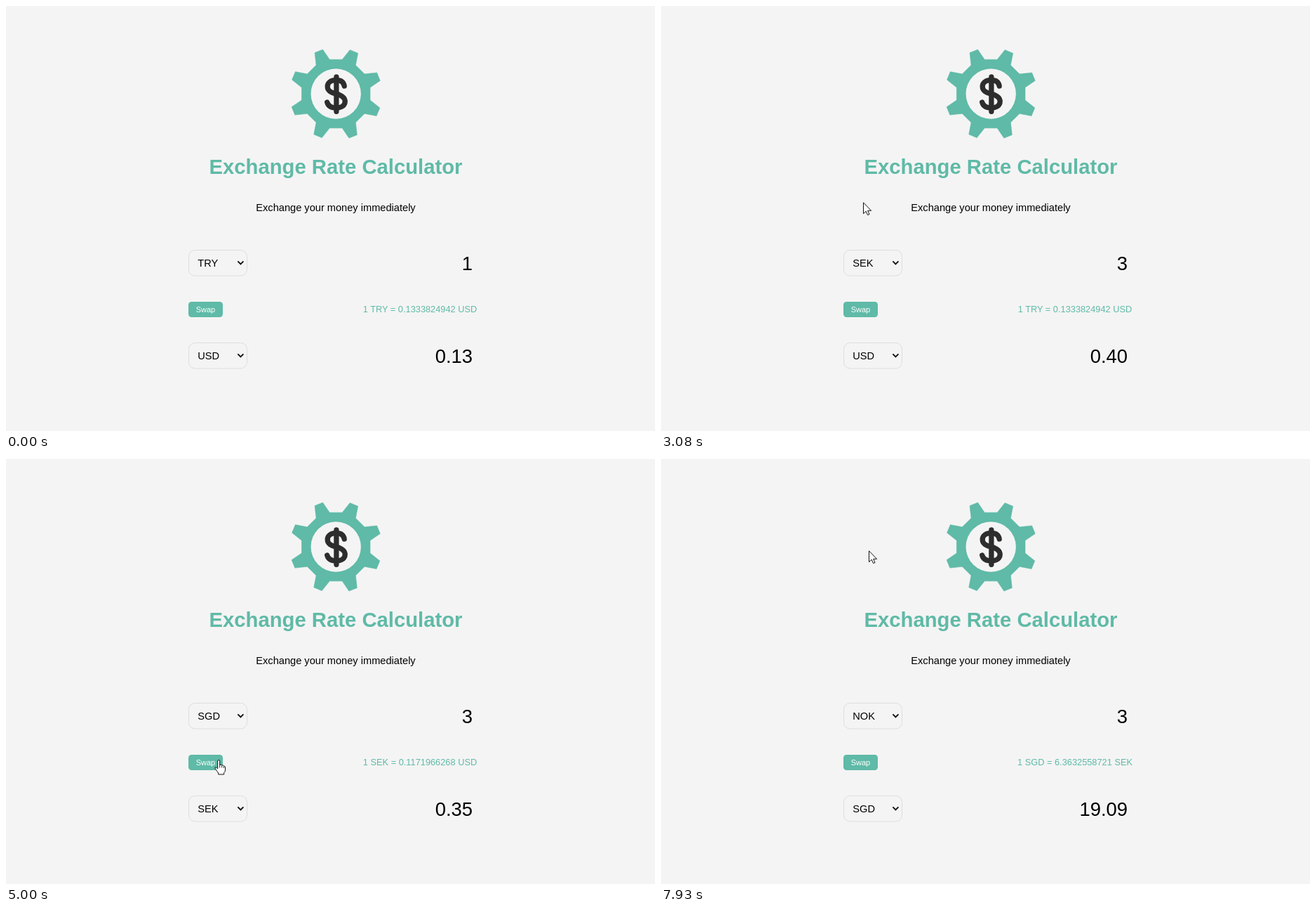
An HTML page that plays this animation: 925x605 px, repeating every 8000 ms.

```html
<!DOCTYPE html>
<html lang="en">
<head>
<meta charset="utf-8">
<title>Exchange Rate Calculator</title>
<style>
html, body { margin: 0; width: 100%; height: 100%; overflow: hidden; background: #f4f4f4; }
svg { display: block; width: 925px; height: 605px; font-family: "Liberation Sans", Arial, sans-serif; font-size: 14.62px; }
.teal { fill: #5fbaa7; }
.big { font-size: 27.4px; text-anchor: end; }
.mid { text-anchor: middle; }
.field { fill: none; stroke: #dedede; }
.chev { fill: none; stroke: #111; stroke-width: 1.9; }
.ink { fill: #fff; stroke: #111; stroke-linejoin: round; }
#menu { filter: drop-shadow(0 0 2px rgba(0, 0, 0, .45)); }
</style>
</head>
<body>
<svg viewBox="0 0 925 605">
  <defs>
    <g id="box">
      <rect class="field" x="260.5" y="-18.5" width="83" height="36.5" rx="9"/>
      <path class="chev" d="M330.4-2.6L334.4 1.4L338.4-2.6"/>
    </g>
  </defs>
  <rect width="925" height="605" fill="#f4f4f4"/>
  <g transform="translate(470.2 125)">
    <path id="gear" class="teal" stroke="#5fbaa7" stroke-width=".6" stroke-linejoin="round"/>
    <circle r="35.7" fill="#f4f4f4"/>
    <g fill="none" stroke="#2d2d2d" stroke-width="7.3" stroke-linecap="round">
      <path d="M12-11C11-17 7-19.5 .5-19.5C-7-19.5-12-16-12-10.5C-12-4-7-2 .5 0C8 2 13 5 13 11C13 16.5 8 20 .5 20C-7 20-11 17.5-12.5 12"/>
      <path d="M.7-24V25.3"/>
    </g>
  </g>
  <text class="teal mid" x="470" y="239" font-size="29.25" font-weight="bold">Exchange Rate Calculator</text>
  <text class="mid" x="470" y="292">Exchange your money immediately</text>

  <use href="#box" y="366"/>
  <text id="from" x="273.3" y="371"></text>
  <use href="#box" y="498"/>
  <text id="to" x="273.3" y="503"></text>

  <rect class="teal" x="260" y="421" width="49" height="22" rx="4.5"/>
  <text class="mid" x="284.5" y="436" font-size="10.97" fill="#fff">Swap</text>
  <text id="rate" class="teal mid" x="590" y="436" font-size="12.8"></text>
  <text id="amount" class="big" x="665" y="376"></text>
  <text id="result" class="big" x="665" y="508"></text>

  <g id="spin">
    <rect x="664" y="350.5" width="14" height="31" fill="#f0f0f0"/>
    <rect id="spinHot" x="664" y="350.5" width="14" height="15.5" fill="#d2d2d2"/>
    <path d="M667.3 361.5L671 357.5L674.7 361.5ZM667.3 371.5L671 375.5L674.7 371.5Z" fill="#505050"/>
  </g>
  <rect id="caret" x="663.5" y="351" width="1.2" height="30"/>

  <g id="menu">
    <rect x="260.5" y="110" width="82.5" height="368.5" fill="#fff" stroke="#767676"/>
    <rect x="327" y="110.5" width="15.5" height="367.5" fill="#f1f1f1"/>
    <rect id="thumb" x="329" width="12" height="129" fill="#c1c1c1"/>
    <path d="M331.2 120.3L335 116.3L338.8 120.3ZM331.2 468L335 472L338.8 468Z" fill="#505050"/>
    <rect id="hot" x="261" width="66" height="18.4" fill="#1e90ff"/>
    <g id="rows"></g>
  </g>

  <g id="cursor">
    <path id="arrow" class="ink" d="M.5 .8V16.6L4.2 13.2L6.6 18.5L9 17.5L6.7 12.3H11.6Z"/>
    <path id="beam" d="M-3-8H-1L0-7L1-8H3M0-7V7M-3 8H-1L0 7L1 8H3" fill="none" stroke="#222"/>
    <g id="hand" transform="translate(-6.3 0)">
      <path class="ink" d="M5 12V2Q5 .5 6.5 .5T8 2V8Q8 7 9.5 7T11 8.5Q11.3 7.7 12.5 8T13.8 9.5Q14.3 9 15 9.3T15.8 11V15Q15.8 17.5 14 18.5V21H6V19Q4 16.5 2 13.5Q.5 11.5 1.5 11T3.5 11.5L5 13Z"/>
      <path d="M8 8V11.5M11 9V11.5M13.8 10V12" fill="none" stroke="#111" stroke-width=".9"/>
    </g>
  </g>
</svg>
<script>
const LOOP = 8000, ENTER = 50, ROW = 18.4, SHOWN = 20, TOP = 110;
const $ = id => document.getElementById(id);
const show = (id, on) => $(id).style.display = on ? '' : 'none';
const put = (id, text) => { if ($(id).textContent !== text) $(id).textContent = text; };
const inside = (x, y, l, t, r, b) => x >= l && x < r && y >= t && y < b;

const codes = ('AED ARS AUD BGN BRL BSD CAD CHF CLP CNY COP CZK DKK DOP EGP EUR FJD GBP GTQ HKD HRK HUF IDR ILS ' +
  'INR ISK JPY KRW KZT MXN MYR NOK NZD PAB PEN PHP PKR PLN PYG RON RUB SAR SEK SGD THB TRY TWD UAH USD UYU VND ZAR').split(' ');
const usd = { TRY: 0.1333824942, SEK: 0.1171966268, SGD: 0.745752123676, USD: 1 };

// User actions; the rate and result follow after `lag`.
const pick = (slot, code) => s => ({ ...s, [slot]: code });
const step = s => ({ ...s, amount: s.amount + 1 });
const swap = s => ({ ...s, from: s.to, to: s.from });
const actions = [
  { at: 1350, lag: 130, run: step },
  { at: 1690, lag: 190, run: step },
  { open: 2400, at: 3040, lag: 1440, slot: 'from', run: pick('from', 'SEK') },
  { open: 3790, at: 4340, lag: 1830, slot: 'to', run: pick('to', 'SGD') },
  { at: 4940, lag: 1730, run: swap },
  { at: 6050, lag: LOOP, run: swap },
  { open: 7240, at: 7900, lag: LOOP, slot: 'from', run: pick('from', 'NOK') }
];
const [up, , menuAction] = actions;

// Pointer moves: begin, end, x, y
const moves = [
  [ENTER, 810, 629, 362], [810, 1320, 671, 350], [1720, 2330, 328, 366],
  [2450, 2950, 288, 279], [3080, 3460, 325, 491], [3790, 4250, 326, 375],
  [4370, 4930, 303, 428], [6860, 7050, 323, 373], [7240, 7800, 296, 130]
];

function stateAt(t) {
  let now = { from: 'TRY', to: 'USD', amount: 1 }, quoted = now;
  for (const a of actions) {
    if (a.at > t) break;
    now = a.run(now);
    if (a.at + a.lag <= t) quoted = now;
  }
  return { now, quoted };
}

function pointer(t) {
  let x = 607, y = 517;
  for (const [begin, end, tx, ty] of moves) {
    const k = Math.min(1, Math.max(0, (t - begin) / (end - begin)));
    const e = k * k * (3 - 2 * k);
    x += (tx - x) * e;
    y += (ty - y) * e;
  }
  return [x, y];
}

function gearPath() {
  const tooth = [[-9, -48.8], [9, -48.8], [20, -62.6], [31.4, -57.8]];
  const pts = [];
  for (let i = 0; i < 8; i++) {
    const c = Math.cos(i * Math.PI / 4), s = Math.sin(i * Math.PI / 4);
    for (const [x, y] of tooth) pts.push((x * c - y * s).toFixed(2) + ' ' + (x * s + y * c).toFixed(2));
  }
  return 'M' + pts.join('L') + 'Z';
}

function drawMenu(t, now, y) {
  const menu = actions.find(a => t >= a.open && t < a.at);
  show('menu', menu);
  if (!menu) return;
  const dy = menu.slot === 'from' ? -132 : 0;
  const first = codes.indexOf(now[menu.slot]) - SHOWN + 1;
  const over = Math.floor((y - dy - TOP) / ROW);
  const hot = over >= 0 && over < SHOWN ? over : SHOWN - 1;
  $('menu').setAttribute('transform', `translate(0 ${dy})`);
  $('thumb').setAttribute('y', TOP + 17 + 334 * first / codes.length);
  $('hot').setAttribute('y', TOP + hot * ROW);
  rows.forEach((row, i) => {
    row.textContent = codes[first + i];
    row.setAttribute('fill', i === hot ? '#fff' : '#000');
  });
}

function drawCursor(t, x, y) {
  const text = inside(x, y, 470, 348, 664, 384);
  const link = inside(x, y, 260, 421, 309, 443);
  show('cursor', t >= ENTER);
  show('beam', text);
  show('hand', link);
  show('arrow', !text && !link);
  $('cursor').setAttribute('transform', `translate(${x.toFixed(1)} ${y.toFixed(1)})`);
}

function draw(t) {
  const { now, quoted } = stateAt(t);
  const rate = usd[quoted.from] / usd[quoted.to];
  const [x, y] = pointer(t);
  put('from', now.from);
  put('to', now.to);
  put('amount', String(now.amount));
  put('rate', `1 ${quoted.from} = ${rate.toFixed(10)} ${quoted.to}`);
  put('result', (quoted.amount * rate).toFixed(2));

  const focused = t >= up.at && t < menuAction.open;
  show('spin', focused || inside(x, y, 470, 335, 680, 384));
  show('spinHot', inside(x, y, 664, 335, 680, 366));
  show('caret', focused && (t - up.at) % 1000 < 500);
  drawMenu(t, now, y);
  drawCursor(t, x, y);
}

$('gear').setAttribute('d', gearPath());
const rows = Array.from({ length: SHOWN }, (_, i) => {
  const row = document.createElementNS('http://www.w3.org/2000/svg', 'text');
  row.setAttribute('x', 273.3);
  row.setAttribute('y', Math.round(TOP + i * ROW + 13.2));
  return $('rows').appendChild(row);
});

const start = performance.now();
function tick() {
  draw((performance.now() - start) % LOOP);
  requestAnimationFrame(tick);
}
tick();
</script>
</body>
</html>
```
